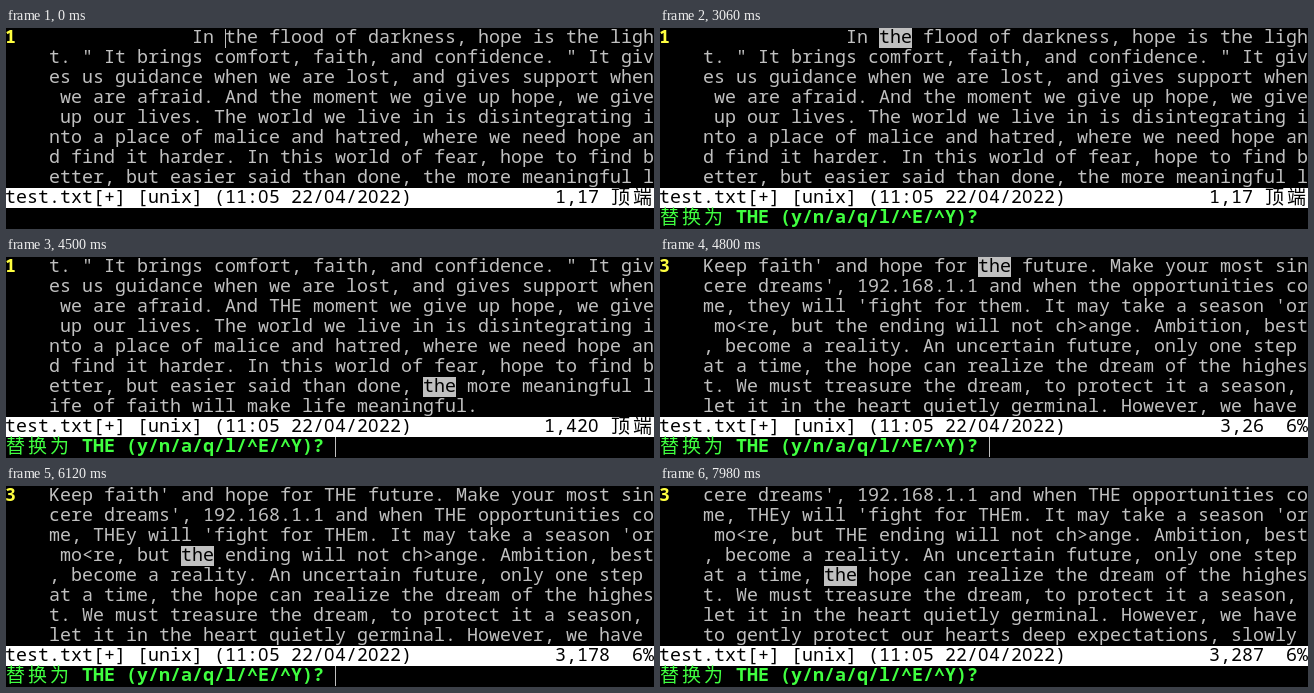
These frames come from a looping animation (648 px wide and 201 px high, 8000 ms). An HTML page:

```html
<!DOCTYPE html>
<html lang="en">
<head>
<meta charset="utf-8">
<title>Substitute with confirmation</title>
<style>
html, body { margin: 0; width: 100%; height: 100%; overflow: hidden; background: #000; }
svg { display: block; width: 648px; height: 201px; }
text { font: 500 18.333px "Noto Sans Mono", "DejaVu Sans Mono", monospace; white-space: pre; }
.bold { font-weight: 700; }
.zero { font-family: "Noto Sans", "Open Sans", sans-serif; }
.wide { font: 300 19px "Noto Sans CJK SC", "Noto Sans CJK", sans-serif; baseline-shift: -1px; }
</style>
</head>
<body>
<svg id="screen" viewBox="0 0 648 201"></svg>
<script>
const LOOP = 8000, CELL = 11, ROW = 20, GUTTER = 4, WRAP = 55, COLS = 59;
const GREY = '#c0c0c0', YELLOW = '#ffff40', GREEN = '#40ff40', WHITE = '#fff', BLACK = '#000';
const PROMPT = '替换为 THE (y/n/a/q/l/^E/^Y)?';

const lines = {
  1: ' '.repeat(13) + 'In the flood of darkness, hope is the light. " It brings comfort, faith, '
    + 'and confidence. " It gives us guidance when we are lost, and gives support when we are afraid. '
    + 'And the moment we give up hope, we give up our lives. The world we live in is disintegrating '
    + 'into a place of malice and hatred, where we need hope and find it harder. In this world of '
    + 'fear, hope to find better, but easier said than done, the more meaningful life of faith will '
    + 'make life meaningful.',
  3: "Keep faith' and hope for the future. Make your most sincere dreams', 192.168.1.1 and when "
    + "the opportunities come, they will 'fight for them. It may take a season 'or mo<re, but the "
    + 'ending will not ch>ange. Ambition, best, become a reality. An uncertain future, only one step '
    + 'at a time, the hope can realize the dream of the highest. We must treasure the dream, to '
    + 'protect it a season, let it in the heart quietly germinal. However, we have to gently protect '
    + 'our hearts deep expectations, slowly '
};

// Each step changes only the listed parts of the state before it.
// cursor: [column, row] or null; done: replacements made in the line.
const steps = [
  { at: 0, line: 1, done: 0, top: 0, lit: false, cmd: '', cursor: [20, 0] },
  { at: 240, cursor: null },
  { at: 720, cursor: [20, 0] },
  { at: 840, cursor: null, cmd: ':' },
  { at: 900, cursor: [1, 9] },
  { at: 1260, cmd: ':%s/the/THE/gc', cursor: [14, 9], lit: true },
  { at: 1740, cursor: null },
  { at: 2280, cursor: [14, 9] },
  { at: 2520, cmd: PROMPT, cursor: [30, 9] },
  { at: 3060, cursor: null },
  { at: 3540, cursor: [30, 9] },
  { at: 3600, done: 1 },
  { at: 4080, done: 2 },
  { at: 4500, done: 3, top: 1 },
  { at: 4800, line: 3, done: 0, top: 0 },
  { at: 5220, done: 1 },
  { at: 5400, done: 2 },
  { at: 5760, done: 3 },
  { at: 6120, done: 4 },
  { at: 6480, done: 5, top: 1 },
  { at: 6960, cursor: null },
  { at: 7500, cursor: [30, 9] },
  { at: 7980, cursor: null }
];
const states = [];
steps.forEach((step, i) => states.push({ ...states[i - 1], ...step }));

const colX = col => col * CELL - 1;
const isWide = c => c > '\u2e80';
const cells = s => [...s].reduce((n, c) => n + (isWide(c) ? 2 : 1), 0);

function glyph(c) {
  if (c === '0') return '<tspan class="zero">0</tspan>';
  if (isWide(c)) return `<tspan class="wide">${c}</tspan>`;
  return c.replace('&', '&amp;').replace('<', '&lt;');
}

function write(str, col, row, fill) {
  if (!str) return '';
  const xs = [];
  for (const c of str) {
    xs.push(colX(col) + (isWide(c) ? 1 : 0));
    col += cells(c);
  }
  const bold = fill === GREEN || fill === YELLOW ? 'class="bold"' : '';
  return `<text ${bold} x="${xs.join(' ')}" y="${row * ROW + 15}" fill="${fill}">`
    + [...str].map(glyph).join('') + '</text>';
}

const box = (x, y, w, h, fill) =>
  `<rect x="${x}" y="${y}" width="${w}" height="${h}" fill="${fill}" shape-rendering="crispEdges"/>`;

function render({ line, done, top, lit, cmd, cursor }) {
  let text = lines[line];
  for (let i = 0; i < done; i++) text = text.replace('the', 'THE');
  const pos = text.indexOf('the');

  let out = box(0, 0, 648, 201, BLACK) + write(String(line), 0, 0, YELLOW);
  for (let row = 0; row < 8; row++) {
    const start = (row + top) * WRAP;
    out += write(text.slice(start, start + WRAP), GUTTER, row, GREY);
  }
  if (lit) {
    const row = Math.floor(pos / WRAP) - top, col = GUTTER + pos % WRAP;
    out += box(colX(col), row * ROW, 3 * CELL, ROW, GREY) + write('the', col, row, BLACK);
  }

  const ruler = `${line},${pos + 1}` + (line === 1 ? ' 顶端' : '  6%');
  out += box(0, 160, 648, ROW, WHITE)
    + write('test.txt[+] [unix] (11:05 22/04/2022)', 0, 8, BLACK)
    + write(ruler, COLS - cells(ruler), 8, BLACK)
    + write(cmd, 0, 9, cmd === PROMPT ? GREEN : GREY);

  if (cursor) {
    const [col, row] = cursor, y = row ? row * ROW : 1;
    out += box(colX(col), y, 1, (row + 1) * ROW - y, GREY);
  }
  return out;
}

const screen = document.getElementById('screen');
const began = performance.now();
let shown;

function tick() {
  const t = (performance.now() - began) % LOOP;
  const state = states.filter(s => s.at <= t).pop();
  if (state !== shown) {
    shown = state;
    screen.innerHTML = render(state);
  }
  requestAnimationFrame(tick);
}
tick();
</script>
</body>
</html>
```
